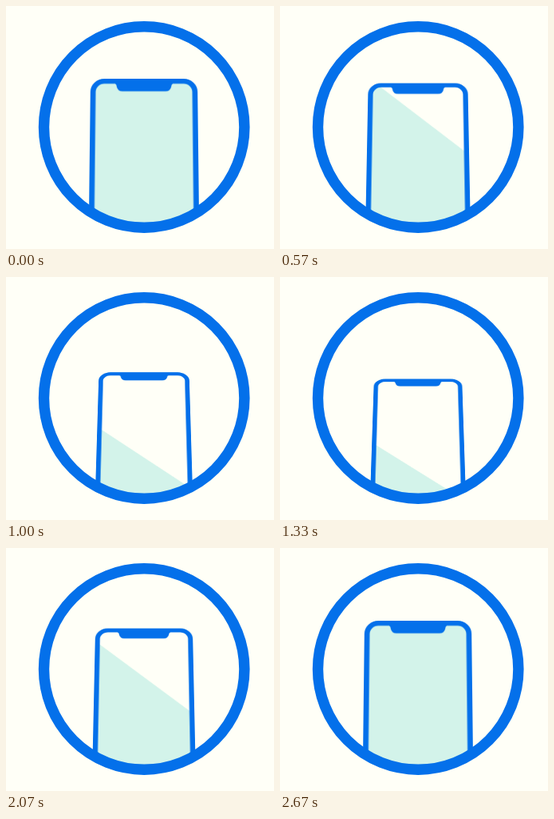
Recreate the animation shown at these times as an HTML page without scripts. Size 336 by 304 pixels, loop 2.71 s.

```html
<!DOCTYPE html>
<html lang="en">
<head>
<meta charset="utf-8">
<title>Tilting phone</title>
<style>
  /* 0 = upright, 1 = fully tilted back */
  @property --tilt {
    syntax: "<number>";
    inherits: true;
    initial-value: 0;
  }

  :root {
    --paper: #fffff7;
    --blue: #0470ea;
    --mint: #d3f3ea;
  }

  html, body {
    margin: 0;
    width: 100%;
    height: 100%;
    overflow: hidden;
    background: var(--paper);
  }

  .stage {
    position: relative;
    width: 336px;
    height: 304px;
    overflow: hidden;
    animation: tilt 2710ms infinite;
  }

  .window {
    position: absolute;
    inset: 0;
    clip-path: circle(126px at 173.2px 151.5px);
  }

  /* The 10px margin inside the drawing keeps its slanted edges smooth. */
  .phone {
    position: absolute;
    left: 96px;
    top: 81px;
    transform-origin: 50% 10px;
    transform:
      translateY(calc(36.5px * var(--tilt) * var(--tilt)))
      perspective(1850px)
      rotateX(calc(18deg + 30deg * var(--tilt)))
      scale(calc(1 - .177 * var(--tilt)));
  }

  .shade {
    fill: var(--mint);
    transform: translateY(calc(-44px + 240px * var(--tilt)));
  }

  .frame { fill: none; stroke: var(--blue); stroke-width: 6.6; }
  .notch { fill: var(--blue); }

  .ring {
    position: absolute;
    inset: 0;
    fill: none;
    stroke: var(--blue);
    stroke-width: 13.4;
  }

  @keyframes tilt {
    0%, 2.2% { --tilt: 0; animation-timing-function: cubic-bezier(.333, 0, .667, 1); }
    46.5%, 54.6% { --tilt: 1; animation-timing-function: cubic-bezier(.333, 0, .667, 1); }
    98.9%, 100% { --tilt: 0; }
  }
</style>
</head>
<body>
<div class="stage">
  <div class="window">
    <svg class="phone" width="154" height="380" viewBox="-10 -10 154 380">
      <clipPath id="screen">
        <rect x="3.3" y="3.3" width="127.4" height="400" rx="14"/>
      </clipPath>
      <g clip-path="url(#screen)">
        <path class="shade" d="M0 -58L134 58V600H0z"/>
      </g>
      <rect class="frame" x="3.3" y="3.3" width="127.4" height="400" rx="14"/>
      <path class="notch" d="M31 4H103V7c-1.5 0-1.5 2-2 4q-1.5 5.5-7 5.5h-54q-5.5 0-7-5.5c-.5-2-.5-4-2-4z"/>
    </svg>
  </div>
  <svg class="ring" width="336" height="304">
    <circle cx="173.2" cy="151.5" r="125.7"/>
  </svg>
</div>
</body>
</html>
```
